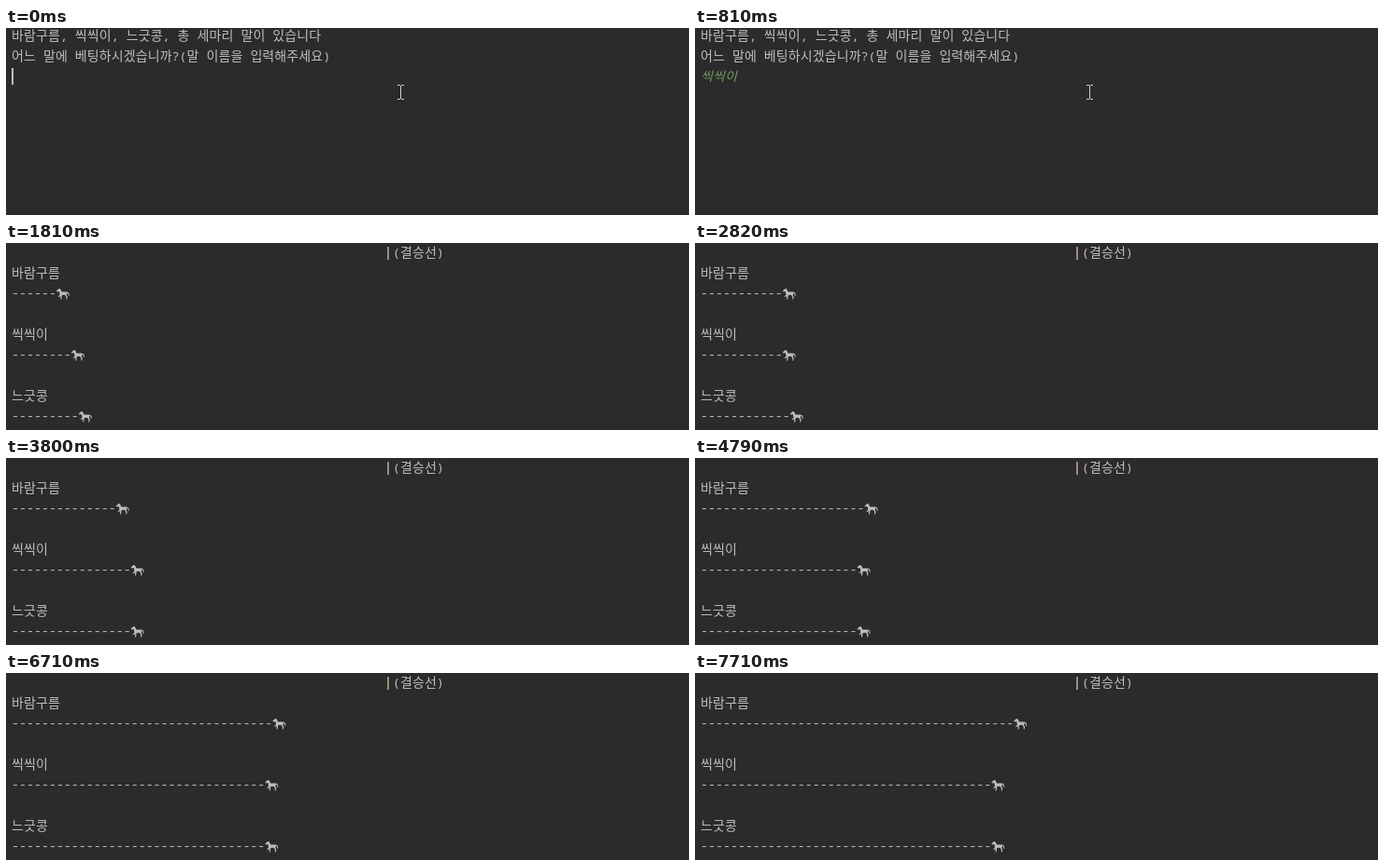
An HTML page with a canvas that plays this animation: 731 px wide and 201 px high, repeating every 8000 ms.

```html
<!DOCTYPE html>
<html lang="ko">
<head>
<meta charset="utf-8">
<title>경마 게임</title>
<style>
  html, body { margin: 0; width: 100%; height: 100%; overflow: hidden; background: #2b2b2b; }
  canvas { display: block; }
</style>
</head>
<body>
<canvas id="stage" width="731" height="201"></canvas>
<script>
const ctx = document.getElementById('stage').getContext('2d');
const LOOP = 8000, LEFT = 6, CELL = 7.98, WIDE = 12.97, LINE = 22;
const GREY = '#bebebe', INPUT = '#6a9f55';
const HANGUL = '14px "Noto Sans CJK KR", "Noto Sans CJK", sans-serif';
const LATIN = '13.3px "Noto Sans Mono", monospace';

const names = ['바람구름', '씩씩이', '느긋콩'];
const pick = names[1];

const horse = new Path2D(
  'M0 2.6 2.6.3 3.6 0Q5 1 5.6 3.4L10 3.5Q13 3 13.6 5L14 8 13 7.4 12.4 5 11.4 4.8Q11.5 6 11 7L12 9 ' +
  '11.4 11.5H10.5L10.6 9 9.2 6.8 6 7 5.4 11.5H4.4L4.4 8 2.4 9.2 2 8.6 3.8 6.6 3 3 1 3.6Z');

// Each leg reaches its standings in a number of equal rounds.
const legs = [
  { end: 1210, rounds: 1, dashes: [3, 3, 3] },
  { end: 1810, rounds: 2, dashes: [6, 8, 9] },
  { end: 2820, rounds: 2, dashes: [11, 11, 12] },
  { end: 3800, rounds: 2, dashes: [14, 16, 16] },
  { end: 4990, rounds: 4, dashes: [24, 22, 23] },
  { end: 5910, rounds: 2, dashes: [29, 26, 28] },
  { end: 6310, rounds: 2, dashes: [33, 32, 32] },
  { end: 7710, rounds: 4, dashes: [42, 39, 39] },
];
// Moments when the console stands empty before a round is printed.
const wipes = [[1110, 1210], [1510, 1610], [2210, 2330], [3200, 3310]];

function standings(time) {
  const next = legs.findIndex(leg => time < leg.end);
  if (next < 0) return legs.at(-1).dashes;
  const from = legs[next - 1], to = legs[next];
  const progress = (time - from.end) / (to.end - from.end);
  const done = Math.floor(progress * to.rounds) / to.rounds;
  return from.dashes.map((count, i) => Math.round(count + (to.dashes[i] - count) * done));
}

function write(text, x, baseline, color = GREY, style = '') {
  ctx.fillStyle = color;
  for (const char of text) {
    const wide = /[가-힣]/.test(char);
    ctx.font = style + (wide ? HANGUL : LATIN);
    ctx.fillText(char, x, baseline);
    x += wide ? WIDE : CELL;
  }
}

function drawMousePointer(x, y) {
  ctx.fillStyle = '#d0d0d0';
  ctx.fillRect(x, y + 1, 1, 14);
  for (const end of [y, y + 15]) {
    ctx.fillRect(x - 3, end, 3, 1);
    ctx.fillRect(x + 1, end, 3, 1);
  }
}

function drawPrompt(time) {
  write(names.join(', ') + ', 총 세마리 말이 있습니다', LEFT, 13);
  write('어느 말에 베팅하시겠습니까?(말 이름을 입력해주세요)', LEFT, 13 + LINE);
  const typed = [100, 300, 610].filter(at => time >= at).length;
  write(pick.slice(0, typed), LEFT, 13 + 2 * LINE, INPUT, 'italic ');

  const entered = typed === pick.length;
  if (time < 810) {
    ctx.fillStyle = GREY;
    const caretX = entered ? LEFT : LEFT + Math.floor(typed * 12.7);
    ctx.fillRect(caretX, entered ? 65 : 43, 2, 18);
  }
  drawMousePointer(422, 61);
}

function drawRace(dashes) {
  const finish = LEFT + 50 * CELL;
  write('|', finish, 15, '#c4b09a', 'bold ');
  write('(결승선)', finish + CELL + 1, 15);
  dashes.forEach((count, i) => {
    const nameLine = 15 + LINE * (1 + 3 * i), track = nameLine + LINE - 1;
    write(names[i], LEFT, nameLine);
    write('-'.repeat(count), LEFT, track);
    ctx.save();
    ctx.translate(LEFT + count * CELL, track - 9);
    ctx.fill(horse);
    ctx.restore();
  });
}

function draw(time) {
  ctx.fillStyle = '#2b2b2b';
  ctx.fillRect(0, 0, 731, 201);
  if (time < wipes[0][0]) drawPrompt(time);
  else if (!wipes.some(([start, end]) => time >= start && time < end)) drawRace(standings(time));
}

const began = performance.now();
function tick() {
  draw((performance.now() - began) % LOOP);
  requestAnimationFrame(tick);
}
tick();
</script>
</body>
</html>
```
